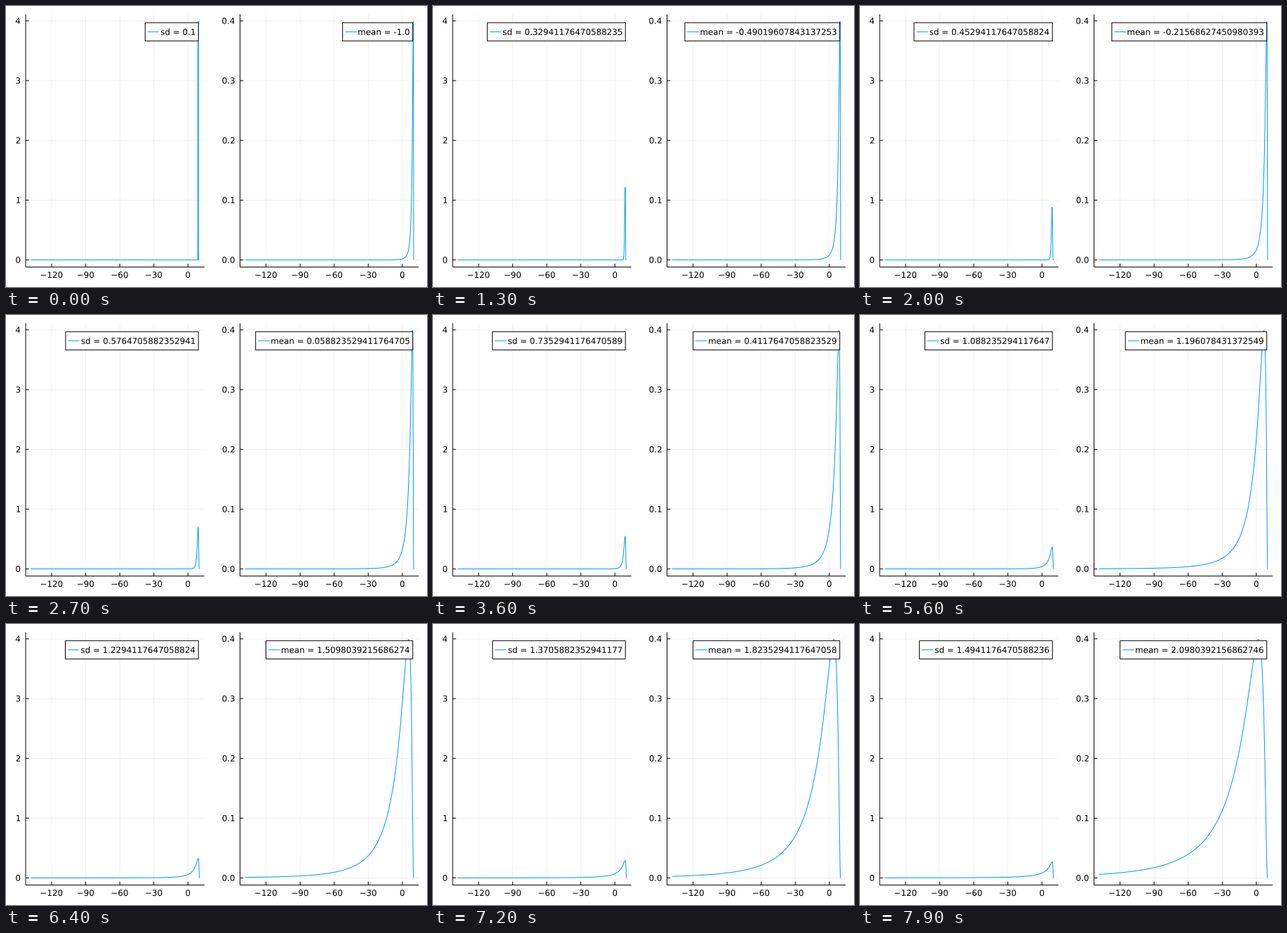
Recreate the animation shown at these times as a matplotlib script. Size 600 by 400 pixels, loop 8000 ms.

```python
import matplotlib.pyplot as plt
import numpy as np
from matplotlib.animation import FuncAnimation
from matplotlib.patches import PathPatch, Rectangle
from matplotlib.textpath import TextPath
from matplotlib.transforms import Affine2D

W, H, DPI = 600, 400, 100
PX = 72 / DPI  # one pixel in points
FRAMES, INTERVAL = 80, 100
BLUE = "#009afa"
TOP, BOTTOM, WIDTH = 11.81, 371.61, 254.65
FONT_SIZE = 11.88

plt.rcParams["font.family"] = "DejaVu Sans"

t = np.linspace(-5, 5, 1001)
x_data = 10 - np.exp(t)


def normal(mean, sd):
    return np.exp(-0.5 * ((t - mean) / sd) ** 2) / (sd * np.sqrt(2 * np.pi))


fig = plt.figure(figsize=(W / DPI, H / DPI), dpi=DPI, facecolor="white")
ax = fig.add_axes([0, 0, 1, 1])
ax.set_xlim(0, W)
ax.set_ylim(H, 0)
ax.axis("off")


def stroke(xs, ys, color="black", width=1, **kw):
    return ax.plot(xs, ys, color=color, lw=width * PX, snap=False,
                   solid_capstyle="butt", **kw)[0]


def grid_line(xs, ys):
    stroke(xs, ys, width=0.5, alpha=0.1)


def text_path(s, x, y, align):
    """Unhinted outline; align 0.5 centres the ink on x, 1 ends it there."""
    path = TextPath((0, 0), s, size=FONT_SIZE)
    ink = path.get_extents()
    dx = x - ink.x0 - align * ink.width
    return path.transformed(Affine2D().scale(1, -1).translate(dx, y))


def write(s, x, y, align, **kw):
    return ax.add_patch(PathPatch(text_path(s, x, y, align), fc="black",
                                  lw=0, snap=False, **kw))


class Panel:
    """One plot with inward ticks, grid, curve and a legend."""

    def __init__(self, left, peak, yticks, yfmt):
        self.left, self.right = left, left + WIDTH
        self.x0, self.x1 = x_data.min(), x_data.max()
        self.peak = peak

        for v in range(-120, 1, 30):
            x = self.px(v)
            grid_line([x, x], [TOP, BOTTOM])
            stroke([x, x], [BOTTOM, BOTTOM - 4.7])
            write(str(v).replace("-", "\u2212"), x, 387, 0.5)
        for v in yticks:
            y = self.py(v)
            grid_line([left, self.right], [y, y])
            stroke([left, left + 4.7], [y, y])
            write(yfmt.format(v), left - 7.9, y + 4.3, 1)
        stroke([left, left], [TOP, BOTTOM])
        stroke([left, self.right], [BOTTOM, BOTTOM])

        self.curve = stroke([], [], BLUE, zorder=3, solid_joinstyle="round")
        self.edge = self.right - WIDTH / 30
        self.box = ax.add_patch(Rectangle((0, 23.8), 1, 26, fc="white",
                                          ec="black", lw=PX, snap=False,
                                          zorder=4))
        self.key = stroke([], [], BLUE, zorder=5)
        self.label = write("0", 0, 0, 1, zorder=5)

    def px(self, v):
        pad = 0.03 * (self.x1 - self.x0)
        span = self.x1 - self.x0 + 2 * pad
        return self.left + (v - self.x0 + pad) / span * WIDTH

    def py(self, v):
        return BOTTOM - (v / self.peak + 0.03) / 1.06 * (BOTTOM - TOP)

    def update(self, y, text):
        self.curve.set_data(self.px(x_data), self.py(y))
        path = text_path(text, self.edge - 4.9, 41.15, 1)
        self.label.set_path(path)
        left = path.get_extents().x0 - 22.6
        self.box.set_x(left)
        self.box.set_width(self.edge - left)
        self.key.set_data([left + 3.7, left + 19.7], [36.8, 36.8])


top = 1 / np.sqrt(2 * np.pi)
spread = Panel(28.04, top / 0.1, range(5), "{}")
shift = Panel(333.54, top, [k / 10 for k in range(5)], "{:.1f}")


def draw(k):
    sd = (51 + 9 * k) / 510
    mean = (2 * k - 51) / 51
    spread.update(normal(0, sd), f"sd = {sd}")
    shift.update(normal(mean, 1), f"mean = {mean}")


anim = FuncAnimation(fig, draw, frames=FRAMES, interval=INTERVAL,
                     repeat=True, repeat_delay=0)
plt.show()
```
